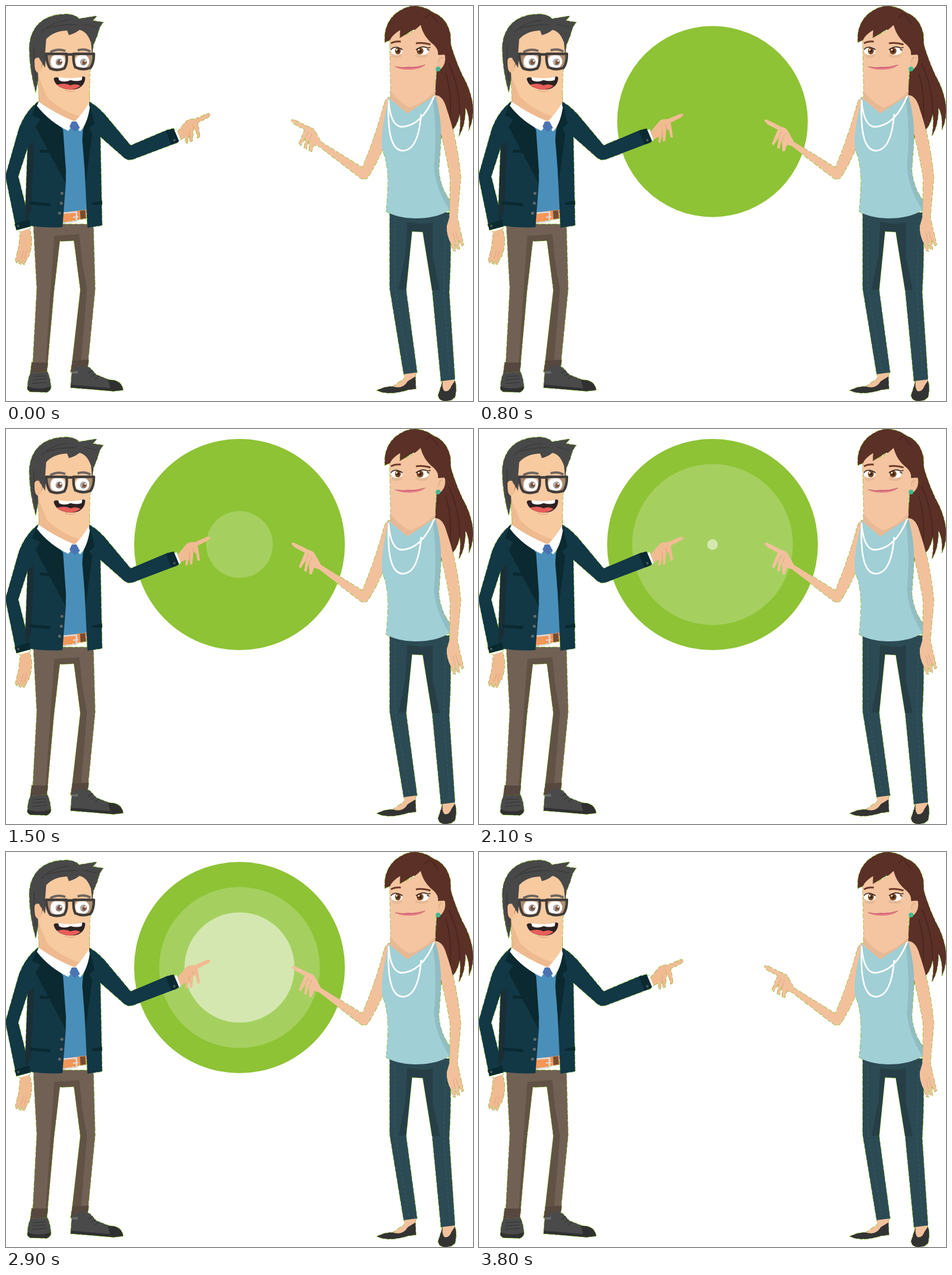
An HTML page with a canvas for the animation above (3900 ms loop, 802 by 677 pixels).

```html
<!DOCTYPE html>
<html lang="en">
<head>
<meta charset="utf-8">
<title>Two people and circles</title>
<style>
html, body { margin: 0; width: 100%; height: 100%; overflow: hidden; background: #fff; }
canvas { display: block; }
</style>
</head>
<body>
<canvas id="stage" width="802" height="677"></canvas>
<script>
const ctx = document.getElementById('stage').getContext('2d');
const LOOP = 3900, STEP = 100;
const EDGE = '#78b414';
let edgesOnly = false;

function fill(color, d) {
  const p = new Path2D(d);
  if (edgesOnly) {
    ctx.strokeStyle = EDGE;
    ctx.lineWidth = 1.3;
    ctx.setLineDash([6, 3, 9, 2]);
    ctx.stroke(p);
    ctx.setLineDash([]);
  } else {
    ctx.fillStyle = color;
    ctx.fill(p);
  }
}

function line(color, width, d, dash = []) {
  if (edgesOnly) return;
  ctx.strokeStyle = color;
  ctx.lineWidth = width;
  ctx.lineJoin = 'round';
  ctx.setLineDash(dash);
  ctx.stroke(new Path2D(d));
  ctx.setLineDash([]);
}

function oval(color, x, y, rx, ry = rx) {
  if (edgesOnly) return;
  ctx.fillStyle = color;
  ctx.beginPath();
  ctx.ellipse(x, y, rx, ry, 0, 0, 7);
  ctx.fill();
}

function manLegs() {
  fill('#716154', 'M47 374L53 485 46 614H71L82 490 92 403 117 402 128 487 114 610 141 608 153 485 150 374Z');
  fill('#615246', 'M83 394L126 391 131 440 139 486 128 487 117 402 92 403 82 490 71 614 68 614 77 480Z');
  fill('#615246', 'M128 487L139 485 129 609 114 610Z');
  fill('#56483f', 'M44 611H72L70 627 42 629Z');
  fill('#56483f', 'M114 608L142 606 140 622 111 627Z');
  fill('#4a4a4b', 'M42 629L71 627Q77 640 77 655L72 661 41 661 37 656Q37 640 42 629Z');
  fill('#303031', 'M37 652Q55 659 77 652L76 658 70 662 43 661 37 658Z');
  line('#343435', 1.2, 'M47 635L68 634M46 641L69 639M45 647L70 645');
  fill('#4a4a4b', 'M113 627L124 618Q136 616 144 620L155 632 178 641Q198 641 201 658L185 660 111 653Z');
  fill('#303031', 'M175 641Q198 640 201 658L185 660 111 654 112 649 179 655Z');
  line('#343435', 1.2, 'M141 630L149 624M146 635L154 630M153 639L160 634');
  fill('#69696a', 'M113 627L123 625 124 630 113 630Z');
}

function manHands() {
  fill('#f1bb92', 'M25 384L40 381Q46 397 43 415L39 429 34 436 32 443 29 442 29 436 25 443 22 441 23 434 18 440 16 437 22 412Z');
  line('#dca481', 1, 'M26 433L30 419M32 433L35 419');
  fill('#f1bb92', 'M295 215L310 197Q316 193 324 194L345 185Q351 184 351 187L347 191 329 200 331 210 333 225 329 226 326 213 322 210 320 231 316 233 315 220 311 235 308 233 309 224 299 229Z');
  line('#dca481', 1, 'M322 211L321 203M315 222L315 211');
}

function jacket() {
  fill('#4a8fba', 'M88 196L132 196 139 355 98 358Z');
  fill('#f39658', 'M98 354L138 349 138 364 98 371Z');
  fill('#744d35', 'M127 351L136 350 137 364 128 365Z');
  line('#dedbdd', 2.6, 'M98 355L121 353 121 369 98 372');
  line('#dedbdd', 2, 'M115 362L124 361');
  fill('#fff', 'M21 384L41 378 42 381 23 387Z');
  fill('#123745', 'M55 164Q33 181 22 211L0 288 0 296 16 374 40 368 21 292 37 243 33 358 34 375Q64 381 97 379L103 300 96 209Z');
  fill('#1b2e36', 'M38 240L48 233 43 350 34 374 33 358Z');
  fill('#0a2930', 'M15 374L40 366 42 378 18 384Z');
  oval('#45565b', 21, 377, 2.2);
  fill('#123745', 'M143 164Q161 174 178 196L214 239 278 212 289 236 220 262Q210 266 203 260L162 224 165 376 140 380 132 220Z');
  fill('#0a2930', 'M53 166L45 187 59 194 51 207 102 303 103 284 98 212Z');
  fill('#0a2930', 'M144 169L152 202 143 209 148 219 137 302 131 230 132 214Z');
  fill('#fff', 'M288 213L293 211 300 230 294 233Z');
  fill('#0a2930', 'M275 215Q276 212 288 210L297 231Q296 235 284 237Z');
  oval('#45565b', 289, 230, 2.2);
  fill('#0a2930', 'M58 246L83 248 83 252 58 251Z');
  fill('#0a2930', 'M40 335L76 338 76 343 40 340Z');
  fill('#0a2930', 'M148 337L165 334 165 340 148 341Z');
  oval('#626b6c', 96, 321, 2.6);
  oval('#626b6c', 95, 338, 2.6);
  oval('#626b6c', 92, 355, 2.6);
}

function manHead() {
  fill('#484848', 'M51 147Q40 108 40 70Q42 39 64 24Q82 13 106 14Q120 15 125 22L156 17 149 25 167 28Q160 35 157 50L150 67 148 85 70 90 57 118Z');
  fill('#f3be93', 'M63 92Q49 83 48 97Q48 115 60 116Z');
  fill('#f7ca9f', 'M67 84L69 57Q81 43 105 42L108 50Q119 47 126 41Q139 43 146 63L148 85 144 115 143 166Q138 183 118 201L57 166 55 114 60 111Z');
  fill('#efba8f', 'M56 118Q62 151 98 169L138 181 118 201 57 166Z');
  fill('#f7ca9f', 'M62 135Q77 166 119 174L143 150 143 167Q140 177 128 190Q88 176 70 155Z');
  fill('#484848', 'M57 90L69 82 67 106 63 99Z');
  line('#373737', 1.2, 'M61 45Q76 28 108 24M69 39Q92 31 122 32M48 70Q47 105 52 128M134 31L155 36');
  fill('#fff', 'M56 164L53 171Q75 199 107 214L117 201 127 215Q139 204 144 174L142 167Q132 184 118 198Q86 185 56 164Z');
  fill('#4b73b4', 'M109 207L113 198H121L127 209 118 216Z');
  line('#6f655f', 4, 'M76 79Q89 72 102 77M123 76Q135 72 145 78');
}

function manFace() {
  fill('rgba(119,94,84,.62)', 'M71 84L103 83 100 106Q88 111 76 106Z');
  fill('rgba(119,94,84,.55)', 'M117 83L149 83 145 106Q132 110 119 105Z');
  oval('#e8c4a9', 90, 95, 14);
  oval('#e8c4a9', 130, 95, 13);
  oval('#fff', 89, 95, 12);
  oval('#fff', 131, 95, 12, 11);
  oval('#8e8580', 91, 96, 6);
  oval('#8e8580', 133, 96, 6);
  oval('#7b4e32', 92, 96, 3.5);
  oval('#7b4e32', 134, 96, 3.5);
  oval('#fff', 94, 94, 1.6);
  oval('#fff', 136, 94, 1.6);
  fill('rgba(255,255,255,.35)', 'M84 85L93 85 81 107 74 103Z');
  fill('rgba(255,255,255,.35)', 'M128 84L138 84 127 106 120 104Z');
  line('#413d3b', 4.4, 'M69 82L104 82Q106 99 100 107Q87 112 76 107Q70 99 69 82ZM116 82L151 82Q151 98 145 106Q132 111 119 105Q115 97 116 82ZM103 83H117');
  fill('#2b2123', 'M82 125Q83 121 91 123Q112 127 130 121Q136 120 136 124Q135 137 122 142Q106 146 91 138Q83 132 82 125Z');
  fill('#fff', 'M90 122Q113 126 131 121L130 127Q121 130 111 127Q99 132 91 127Z');
  fill('#e85e59', 'M87 135Q102 131 111 136Q120 132 128 137Q119 144 106 143Q95 141 87 135Z');
  line('#dca481', 1.2, 'M101 144Q110 148 119 145');
}

function man() {
  manLegs();
  manHands();
  jacket();
  manHead();
  manFace();
}

function womanLegs() {
  fill('#f2c19c', 'M684 629L704 628 702 643 690 654 663 653 684 639Z');
  fill('#f2c19c', 'M750 640L770 639 770 651 758 667 748 660Z');
  fill('#2c4a53', 'M659 354H761Q766 410 761 490L771 640 747 643 732 487 716 387 697 386 687 486 706 628 683 631 659 484Z');
  fill('#273e47', 'M689 370Q710 376 733 371L733 430 745 487 732 487 716 387 697 386 687 486 674 486 686 428Z');
  line('#35606a', 1, 'M668 365L668 483 692 625M755 366L752 490 762 638', [4, 4]);
  fill('#333334', 'M637 659Q650 652 664 652Q681 658 690 643L703 635 704 656 690 658Q658 668 637 659Z');
  fill('#333334', 'M750 642Q748 655 753 660Q761 662 765 651L771 642Q775 656 771 670Q766 677 755 677Q744 677 742 668Z');
}

function womanHair() {
  fill('#5a3027', 'M651 62Q648 35 666 16Q684 0 703 0Q722 2 733 11Q757 20 763 48L764 67Q775 104 791 133Q803 161 802 183Q801 199 795 212Q797 187 789 174Q789 205 778 222Q782 197 779 185Q774 215 748 225L737 150 742 80 700 40Z');
  line('#46231e', 1.4, 'M712 31Q719 19 729 12M730 14Q750 35 755 66M718 34Q738 46 748 73M760 98Q779 138 779 184M755 115Q767 152 762 198');
}

function womanArms() {
  fill('#f2c19c', 'M661 157Q653 154 648 173Q634 225 612 277L541 233 531 215Q527 208 519 207L495 195Q489 194 491 198L496 203 513 212 503 236 506 239 515 225 512 243 516 245 520 229 521 249 525 249 529 238 537 240 609 295Q617 299 622 293Q638 267 648 242L662 190Z');
  line('#daa886', 1, 'M515 225L519 216M521 230L525 219');
  fill('#f2c19c', 'M735 153Q750 151 757 177Q774 225 781 294L775 361 779 380 786 409 783 411 777 400 779 418 775 416 771 403 772 420 768 419 764 407Q756 392 757 377L762 360 763 295Q753 234 738 188Z');
  line('#daa886', 1, 'M771 404L768 389M777 401L772 386');
}

function womanTop() {
  fill('#f2c19c', 'M660 145L738 145 735 163 688 190 661 165Z');
  fill('#a0cfd5', 'M657 157L689 184 737 152Q748 190 747 225L743 282Q746 312 762 333L761 350Q740 364 702 364Q670 363 653 352Q658 300 655 282Q653 260 646 246Q643 221 652 183Z');
  fill('#91bdc3', 'M737 152Q748 190 747 225L743 282Q746 312 762 333V350Q738 315 735 275Q741 218 733 158Z');
  line('#fff', 2.8, 'M657 161Q660 204 678 207Q714 207 736 153M657 166Q654 247 681 248Q708 248 713 185');
}

function womanFace() {
  fill('#f2c19c', 'M739 85Q748 77 754 85Q756 99 747 108L739 106Z');
  line('#dca987', 1.4, 'M743 97Q742 89 749 88');
  fill('#f4c5a0', 'M659 61Q660 52 677 41L676 54Q701 45 712 32Q721 56 742 71L743 88 738 111 737 151 690 180 661 156Z');
  fill('#e7b994', 'M661 146Q675 165 694 174Q722 164 737 145V153L689 184 661 160Z');
  fill('#5a3027', 'M651 62Q649 42 661 28L711 15 713 32Q697 42 676 55L680 40Q664 46 651 62Z');
  fill('#5a3027', 'M712 20Q735 18 755 43L757 83 742 84Q743 74 734 66Q717 53 712 32Z');
  oval('#e6b995', 671, 85, 9, 4);
  oval('#e6b995', 714, 85, 11, 4);
  oval('#fff', 671, 77, 10, 7);
  oval('#fff', 715, 77, 11, 7);
  oval('#7d461e', 673, 77, 5, 6);
  oval('#7d461e', 711, 77, 6);
  oval('#33221c', 673, 77, 2.5);
  oval('#33221c', 711, 77, 2.7);
  oval('#fff', 671, 75, 1.5);
  oval('#fff', 709, 75, 1.5);
  line('#3b2822', 1.7, 'M661 75L664 72Q671 68 681 75M704 75Q715 67 724 72L729 71M723 74L727 76');
  line('#6e3a2b', 3, 'M661 64Q668 60 678 61M704 64Q716 62 729 66');
  fill('#e77787', 'M668 104Q678 106 691 104Q707 106 720 101Q711 109 692 109Q676 109 668 104Z');
  line('#bd5c6b', 1, 'M668 104Q693 109 720 101');
  oval('#3eb990', 742, 108, 4);
}

function woman() {
  womanLegs();
  womanHair();
  womanArms();
  womanTop();
  womanFace();
}

// Linear growth, then an optional overshoot before the resting size.
function radius(t, c) {
  if (t < c.start) return 0;
  if (t >= c.settle) return c.size;
  if (t >= c.peakAt) return c.peak;
  return c.first + c.grow * (t - c.start) / STEP;
}

const circles = [
  { rgb: [142, 195, 53], start: 100, first: 19.5, grow: 20.6, peakAt: 1000, peak: 195.5, settle: 1100, size: 181 },
  { rgb: [165, 208, 95], start: 1300, first: 16.8, grow: 20.2, peakAt: 1900, peak: 138, settle: 1900, size: 138 },
  { rgb: [212, 231, 176], start: 2100, first: 9.2, grow: 17.06, peakAt: 2700, peak: 105.5, settle: 2900, size: 94.5 }
];
const MATTE = [113, 184, 0];

function drawCircles(t) {
  if (t >= 3800) return;
  const fade = Math.max(0, (t - 3400) / 400);
  for (const c of circles) {
    const r = radius(t, c);
    const rgb = c.rgb.map((v, i) => Math.round(v + (MATTE[i] - v) * fade));
    if (r) oval(`rgb(${rgb})`, 401, 198, r);
  }
}

function draw(t) {
  ctx.fillStyle = '#fff';
  ctx.fillRect(0, 0, 802, 677);
  edgesOnly = true;
  man();
  woman();
  edgesOnly = false;
  drawCircles(t);
  man();
  woman();
}

let shown = -1;
function tick() {
  const t = Math.floor(performance.now() % LOOP / STEP) * STEP;
  if (t !== shown) draw(shown = t);
  requestAnimationFrame(tick);
}
tick();
</script>
</body>
</html>
```
